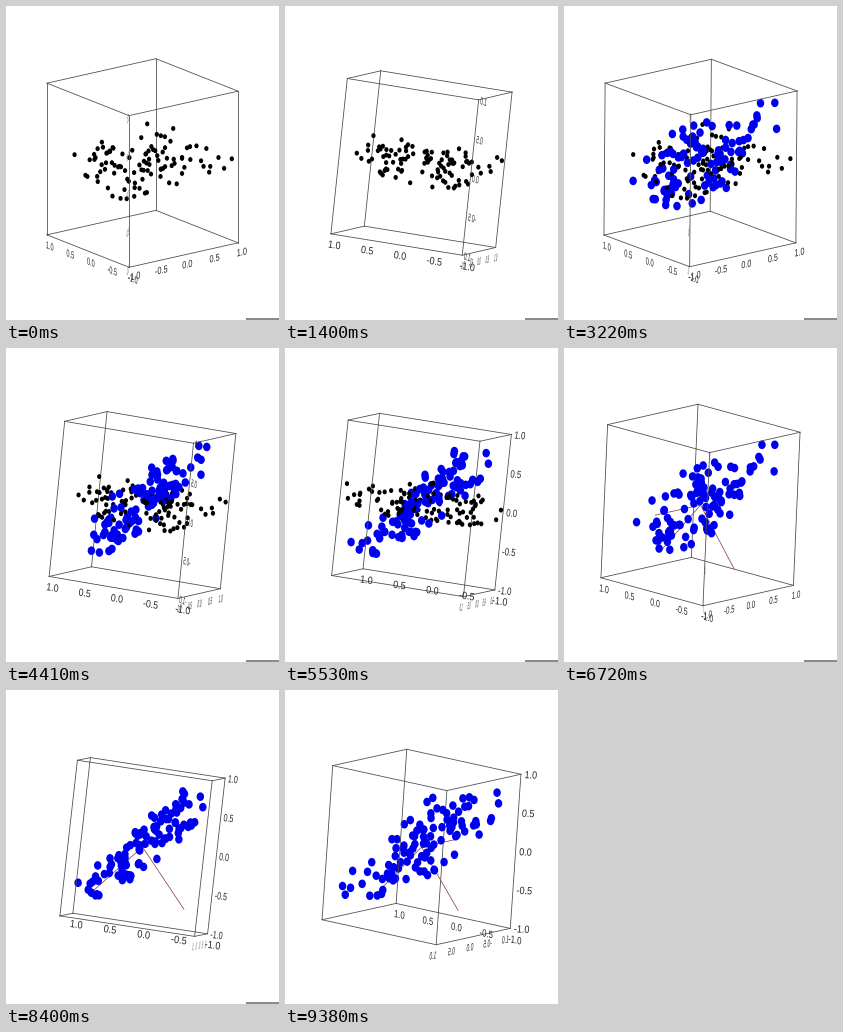
A matplotlib script for the animation above (9450 ms loop, 273 px wide and 314 px high).

```python
import itertools

import matplotlib.pyplot as plt
import numpy as np
from matplotlib.animation import FuncAnimation
from matplotlib.patches import PathPatch, Rectangle
from matplotlib.path import Path
from matplotlib.textpath import TextPath
from matplotlib.transforms import Affine2D

W, H = 273, 314
FRAMES, STAGE, INTERVAL = 135, 45, 70
PX = 0.72                      # one pixel in points
SCALE = np.array([W / 4, -H / 4])
CENTER = np.array([W / 2, H / 2])
FLIP = 27                      # step at which the upright labels turn over
EM = 0.135                     # label size in box units

# Outer points of the flat cloud as (y, x, z) in hundredths
OUTER = np.array([
    (-98, 90, 12), (-96, 67, 17), (-66, 100, -9), (-88, 58, 5), (-92, 53, -1),
    (-65, -81, 17), (-99, -89, 3), (-79, -50, 15), (-82, -28, 14),
    (-94, -86, -10), (-73, -84, -18), (-66, -90, -18), (42, -93, 17),
    (96, 81, 18), (88, 100, 1), (82, 88, 6), (58, 100, 17), (80, 58, 7),
    (46, 86, 5), (54, 57, 1), (86, 46, -9), (86, 28, -11), (92, 5, -7),
    (96, -10, 0), (79, -13, 6), (79, -15, 13), (66, -5, 7), (44, -50, -19),
    (45, -33, -4), (51, -15, 11), (20, -67, -18), (-2, -65, -22),
    (-53, -73, -12), (-41, -86, -21), (-44, 84, 15), (-40, 57, 21),
    (-16, 87, 12), (-55, 66, 4), (5, -85, 24), (2, -58, 24), (-27, -65, 11),
])[:, [1, 0, 2]] / 100


def make_cloud():
    rng = np.random.default_rng(12)
    n = 100 - len(OUTER)
    fill = rng.uniform((-0.75, -0.72, -0.19), (0.8, 0.5, 0.19), (n, 3))
    return np.vstack([OUTER, fill])


def spin(axis, deg):
    """Rotation matrix about an axis."""
    x, y, z = np.array(axis) / np.linalg.norm(axis)
    k = np.array([[0, -z, y], [z, 0, -x], [-y, x, 0]])
    t = np.radians(deg)
    return np.eye(3) + np.sin(t) * k + (1 - np.cos(t)) * k @ k


def base_view(az=37, el=15):
    a, e = np.radians([az, el])
    return np.array([
        [np.cos(a), -np.sin(a), 0],
        [np.sin(a) * np.sin(e), np.cos(a) * np.sin(e), np.cos(e)],
        [-np.sin(a) * np.cos(e), -np.cos(a) * np.cos(e), np.sin(e)],
    ])


def to_screen(p, view):
    q = np.asarray(p) @ view.T
    return CENTER + q[..., :2] * SCALE, q[..., 2]


VIEW = base_view()
TILT = spin((1, 0, 0), -45)
FLAT = make_cloud()
TILTED = FLAT @ TILT.T
X, Y, Z = np.eye(3)
OUT = -(X + Y) / np.sqrt(2)    # outward from the labelled upright edge

CORNERS = [np.array(c) for c in itertools.product((-1, 1), repeat=3)]
EDGES = [np.array([p, q]) for p, q in itertools.combinations(CORNERS, 2)
         if np.sum(p != q) == 1]
VECTORS = [np.array([np.zeros(3), v]) for v in (TILT @ Y, -X, -TILT @ Z)]

fig = plt.figure(figsize=(W / 100, H / 100), dpi=100, facecolor="white")
ax = fig.add_axes([0, 0, 1, 1])
ax.set_xlim(0, W)
ax.set_ylim(H, 0)
ax.axis("off")

edge_lines = [ax.plot([], [], color="#4c4c4c", lw=0.8 * PX)[0] for _ in EDGES]
vec_lines = [ax.plot([], [], color="#8f4a52", lw=0.8 * PX, zorder=2.5)[0]
             for _ in VECTORS]
circle = Path.unit_circle()
oval = Path(circle.vertices * (W / H, 1), circle.codes)
dots = ax.scatter([], [], marker=oval, linewidths=0, zorder=3)
bar = ax.add_patch(Rectangle((240, 312), 33, 2, fc="#8a8a8a", lw=0))

labels = []
for axis, value in itertools.product("xyz", (-1, -0.5, 0, 0.5, 1)):
    path = TextPath((0, 0), f"{value:.1f}", size=1,
                    prop={"family": "Liberation Sans"})
    patch = ax.add_patch(PathPatch(path, fc="#262626", lw=0, zorder=5))
    labels.append((axis, value, path.get_extents().x1, patch))


def label_frame(axis, value, width, step):
    """Start point and reading direction of a tick label in the box."""
    if axis == "x":
        return np.array([value, -1, -1]) - 0.025 * X - 0.178 * Z, X
    if axis == "y":
        return np.array([-1, value, -1]) + 0.025 * Y - 0.178 * Z, -Y
    start = np.array([-1, -1, value]) + 0.055 * OUT - 0.048 * Z
    if step < FLIP:
        return start + width * EM * OUT, -OUT
    return start, OUT


def place_label(label, view, step):
    axis, value, width, patch = label
    origin, along = label_frame(axis, value, width, step)
    pts, _ = to_screen([origin, origin + EM * along, origin + EM * Z], view)
    u, v = pts[1] - pts[0], pts[2] - pts[0]
    m = Affine2D.from_values(u[0], u[1], v[0], v[1], *pts[0])
    patch.set_transform(m + ax.transData)


def draw(i):
    stage, step = divmod(i, STAGE)
    view = VIEW @ spin((0, 1, 3), 2 * step)

    for line, edge in zip(edge_lines, EDGES):
        xy, depth = to_screen(edge, view)
        line.set_data(xy[:, 0], xy[:, 1])
        line.set_zorder(4 if depth.mean() > 0 else 2)
    for line, vec in zip(vec_lines, VECTORS):
        xy, _ = to_screen(vec, view)
        line.set_data(xy[:, 0], xy[:, 1])
        line.set_visible(stage == 2)

    groups = []
    if stage < 2:
        groups.append((FLAT, 4.9, (0, 0, 0)))
    if stage > 0:
        groups.append((TILTED, 8.6, (0, 0, 0.94)))
    xy, depth = to_screen(np.vstack([g[0] for g in groups]), view)
    sizes = np.concatenate([[(g[1] * PX) ** 2] * len(g[0]) for g in groups])
    colors = np.vstack([[g[2]] * len(g[0]) for g in groups])
    order = np.argsort(depth)
    dots.set_offsets(xy[order])
    dots.set_sizes(sizes[order])
    dots.set_facecolors(colors[order])

    for label in labels:
        place_label(label, view, step)
    bar.set_visible(i < FRAMES - 1)
    return []


anim = FuncAnimation(fig, draw, frames=FRAMES, interval=INTERVAL,
                     init_func=lambda: draw(0), repeat=True, repeat_delay=0)
plt.show()
```
